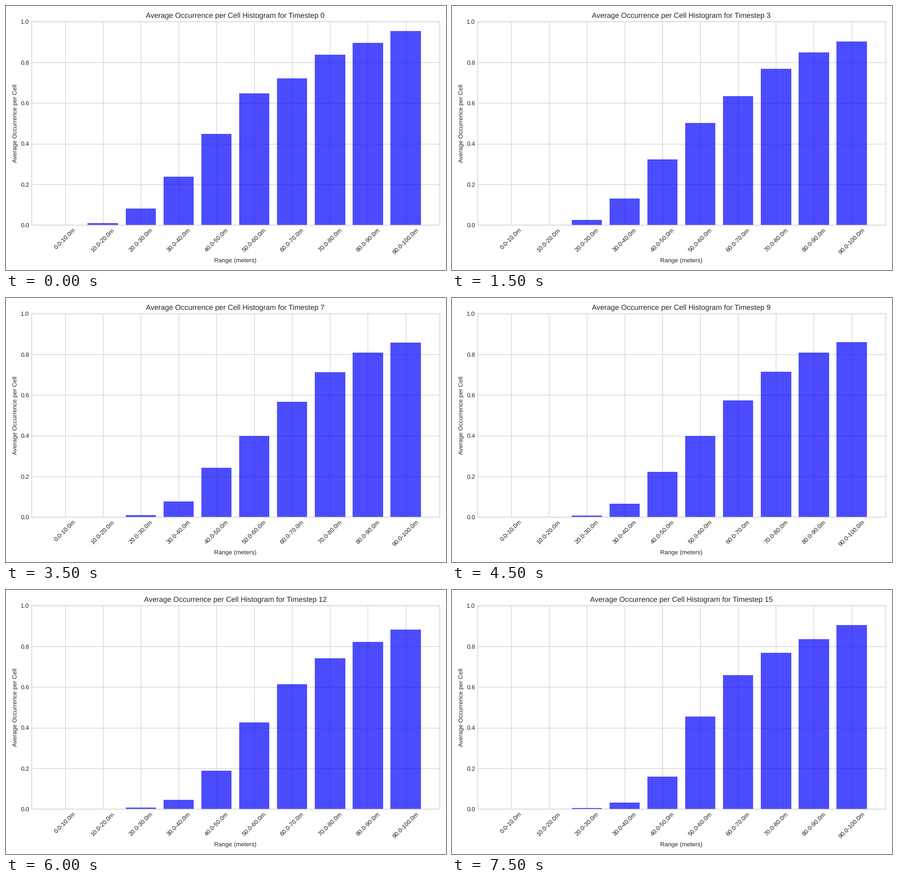
A matplotlib script for the animation above (8000 ms loop, 966 by 580 pixels).

```python
import numpy as np
import matplotlib.pyplot as plt
from matplotlib.animation import FuncAnimation

W, H, DPI = 966, 580, 100
STEPS, STEP_MS, TURN = 16, 500, 8

plt.style.use("seaborn-v0_8-whitegrid")
plt.rcParams.update({
    "font.family": "Liberation Sans",
    "font.size": 10 * W / 1000,
    "text.hinting": "none",
})

# Key profiles over the ten ranges: first step, turning point, last step.
START = np.array([0, .009, .081, .238, .449, .648, .722, .837, .896, .955])
LOW = np.array([0, 0, .008, .073, .235, .390, .560, .706, .805, .853])
END = np.array([0, 0, .006, .033, .159, .455, .659, .768, .835, .905])


def blend(a, b, t):
    """Geometric mix, so that small bars shrink fastest."""
    return a ** (1 - t) * b ** t


def heights(step):
    if step < TURN:
        return blend(START, LOW, 1 - (1 - step / TURN) ** 1.5)
    return blend(LOW, END, (step - TURN) / (STEPS - 1 - TURN))


def title(step):
    return f"Average Occurrence per Cell Histogram for Timestep {step}"


fig, ax = plt.subplots(figsize=(W / DPI, H / DPI), dpi=DPI)
labels = [f"{a:.1f}-{a + 10:.1f}m" for a in range(0, 100, 10)]
bars = ax.bar(labels, heights(0), color="blue", alpha=0.7)
ax.set_ylim(0, 1)
ax.set_xlabel("Range (meters)")
ax.set_ylabel("Average Occurrence per Cell")
ax.tick_params(axis="x", rotation=45)
heading = ax.set_title(title(0))
fig.tight_layout()


def update(step):
    for bar, h in zip(bars, heights(step)):
        bar.set_height(h)
    heading.set_text(title(step))
    return [*bars, heading]


anim = FuncAnimation(fig, update, frames=STEPS, interval=STEP_MS,
                     repeat=True, repeat_delay=0, blit=False)
plt.show()
```
